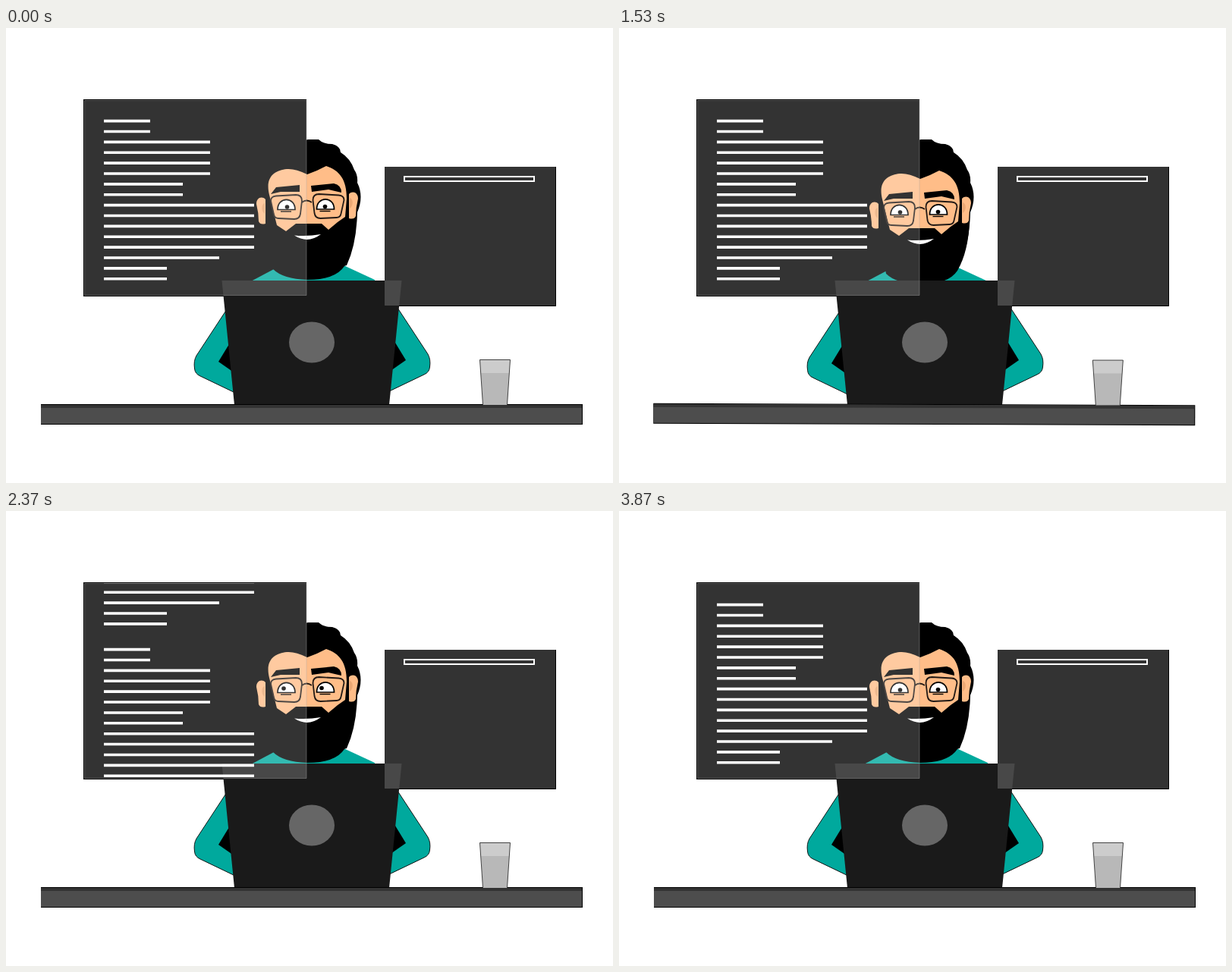
Write an HTML page that moves like this. It is 800x600 px and loops after 4.14 s.

```html
<!DOCTYPE html>
<html>
<head>
<meta charset="utf-8">
<style>
  html, body { margin: 0; width: 100%; height: 100%; overflow: hidden; background: #fff; }
  svg { display: block; width: 100vw; height: 100vh; }
  .skin { fill: #ffbd88; }
  .teal { fill: #00a99d; }
  .glasses { fill: none; stroke: #211915; stroke-width: 1.8; }
  .glow { fill: #fff; fill-opacity: .2; }
</style>
</head>
<body>
<svg viewBox="0 0 800 600">
  <defs><clipPath id="screen"><path d="M103 95H396V353H103z"/></clipPath></defs>

  <!-- screens behind the man -->
  <path d="M102 94H396V354H102zM499 183H725V367H499z"/>

  <path id="shirt" class="teal" d="M321 335L353 318L445 313L486 332V336H321z"/>
  <path d="M385 150L398 147L412 147Q418 153 430 153Q441 156 441 164Q454 172 459 187Q464 194 463 204Q472 222 463 243Q462 285 449 313L400 326L335 240z"/>

  <g id="face">
    <path d="M336 235L462 246Q461 288 446 314Q434 332 397 332Q365 331 352 318z"/>
    <path class="skin" d="M347 220C341 195 355 188 370 186Q381 185 397 193Q409 189 422 182C440 188 449 200 449 225L447 249L437 256L425 266L416 258H382L369 268L357 260z"/>
    <g id="ear">
      <path class="skin" d="M342 226C337 221 330 224 330 232Q333 244 333 255Q335 260 342 258z"/>
      <path fill="#eba874" d="M341 231C336 232 336 242 341 245z"/>
    </g>
    <use href="#ear" transform="translate(794 -7) scale(-1 1)"/>
    <path fill="#fff" d="M380 273.500Q398 275 415 272Q398 285 380 273.500z"/>

    <g id="eyes">
      <g id="eye">
        <path fill="#fff" stroke="#000" stroke-width="1.7" d="M358 239.500C358 222 381 222 381 239.500z"/>
        <path stroke="#000" stroke-width="1.4" d="M362 242H376"/>
      </g>
      <use href="#eye" x="51.500" y="-.5"/>
      <g id="pupils"><circle cx="370.500" cy="236" r="2.8"/><circle cx="420.500" cy="235.500" r="2.8"/></g>
    </g>

    <g id="brows">
      <path d="M349 219L356 210L387 207V216H362zM402 208L432 205Q442 207 442 217L425 213L403 216z"/>
      <g class="glasses">
        <path id="lens" d="M349 228Q349 222 356 221.500L382 220Q390 220 390 228L388 245Q387 252 380 252L359 251Q354 251 353 246z"/>
        <use href="#lens" transform="translate(794.500 -1) scale(-1 1)"/>
        <path d="M390 230Q396 225 403 230"/>
      </g>
    </g>
  </g>

  <g id="leftArm">
    <g id="arm">
      <path class="teal" stroke="#000" stroke-width=".9" d="M292 369.500L251 432Q247 439 248.500 449Q249 456 256 459L306 483V369.500z"/>
      <path d="M294 417L280 440L300 454z"/>
    </g>
  </g>
  <use href="#arm" transform="translate(807 -2) scale(-1 1)"/>

  <path fill="#1a1a1a" d="M284.500 333H521.500L504.500 502H301.500z"/>
  <ellipse cx="403" cy="414.500" rx="30" ry="27" fill="#666"/>

  <g id="desk">
    <path d="M46 496H760V523H46z"/>
    <path fill="#4d4d4d" d="M46 497H759V522H46z"/>
    <path fill="#333" d="M46 497H759V501H46z"/>
  </g>
  <g id="glass">
    <path fill="#b8b8b8" d="M624.500 437.500H664.500L660.500 497H628.500z"/>
    <path fill="#ccc" d="M624.500 437.500H664.500L663.300 455H625.700z"/>
    <path fill="none" stroke="#333" stroke-width=".9" d="M628.500 497L624.500 437.500H664.500L660.500 497"/>
  </g>

  <!-- translucent screen surfaces -->
  <path class="glow" stroke="#aaa" stroke-opacity=".4" d="M103.500 95.500H396V352.500H103.500z"/>
  <path class="glow" d="M499 183H724V366H499z"/>

  <g clip-path="url(#screen)"><path id="code" stroke="#fff" stroke-width="3.6"/></g>
  <g fill="none" stroke="#fff" stroke-width="2">
    <path d="M525 196H696V202H525z"/>
    <rect id="drop" x="525" y="202" width="171"/>
  </g>
</svg>
<script>
const LOOP = 4140, PAGE = 242, SWAY_STEP = 310;
const sway = [0, .55, -.5, 1.04, -.5, .2, -.58, 0]; // desk angles, evenly spaced in time
const $ = id => document.getElementById(id);
const shift = (id, x, y) => $(id).setAttribute('transform', `translate(${x} ${y})`);

// Eased rise from 0 to 1 between two times.
function ramp(t, from, to) {
  const p = Math.min(1, Math.max(0, (t - from) / (to - from)));
  return p * p * (3 - 2 * p);
}

// Runs of equal code lines: count and length.
const runs = [[2, 61], [4, 140], [2, 104], [5, 198], [1, 152], [2, 83]];
const lines = runs.flatMap(([count, length]) => Array(count).fill(length));
$('code').setAttribute('d', [0, PAGE].map(page =>
  lines.map((length, i) => `M129 ${122.6 + i * 13.88 + page}h${length}`).join('')).join(''));

function draw(t) {
  const tilt = sway.reduce((sum, angle, i) => i ?
    sum + (angle - sway[i - 1]) * ramp(t, (i - 1) * SWAY_STEP, i * SWAY_STEP) : 0, 0);
  $('desk').setAttribute('transform', `rotate(${tilt} 400 300)`);
  shift('glass', -Math.abs(tilt), tilt * 3);
  shift('leftArm', 0, -2.6 * Math.sin(Math.min(1, t / 2250) * 2 * Math.PI));

  const nod = ramp(t, 60, 500) - ramp(t, 1660, 1900);
  shift('face', 0, nod * 6);
  shift('brows', 0, nod * 3);
  shift('eyes', 0, nod);
  shift('shirt', 0, nod * 2);

  const look = -ramp(t, 1740, 2130) + 1.8 * ramp(t, 2700, 3000) - .8 * ramp(t, 3500, 3870);
  shift('pupils', look * 4.5, -Math.abs(look) * 2);

  shift('code', 0, -(PAGE - 1) * ramp(t, 1740, 2670));
  $('drop').setAttribute('height', 152 * (ramp(t, 2730, 3180) - ramp(t, 3420, 3840)));
}

function frame(now) {
  draw(Math.floor(now % LOOP / 30) * 30);
  requestAnimationFrame(frame);
}
draw(0);
requestAnimationFrame(frame);
</script>
</body>
</html>
```
